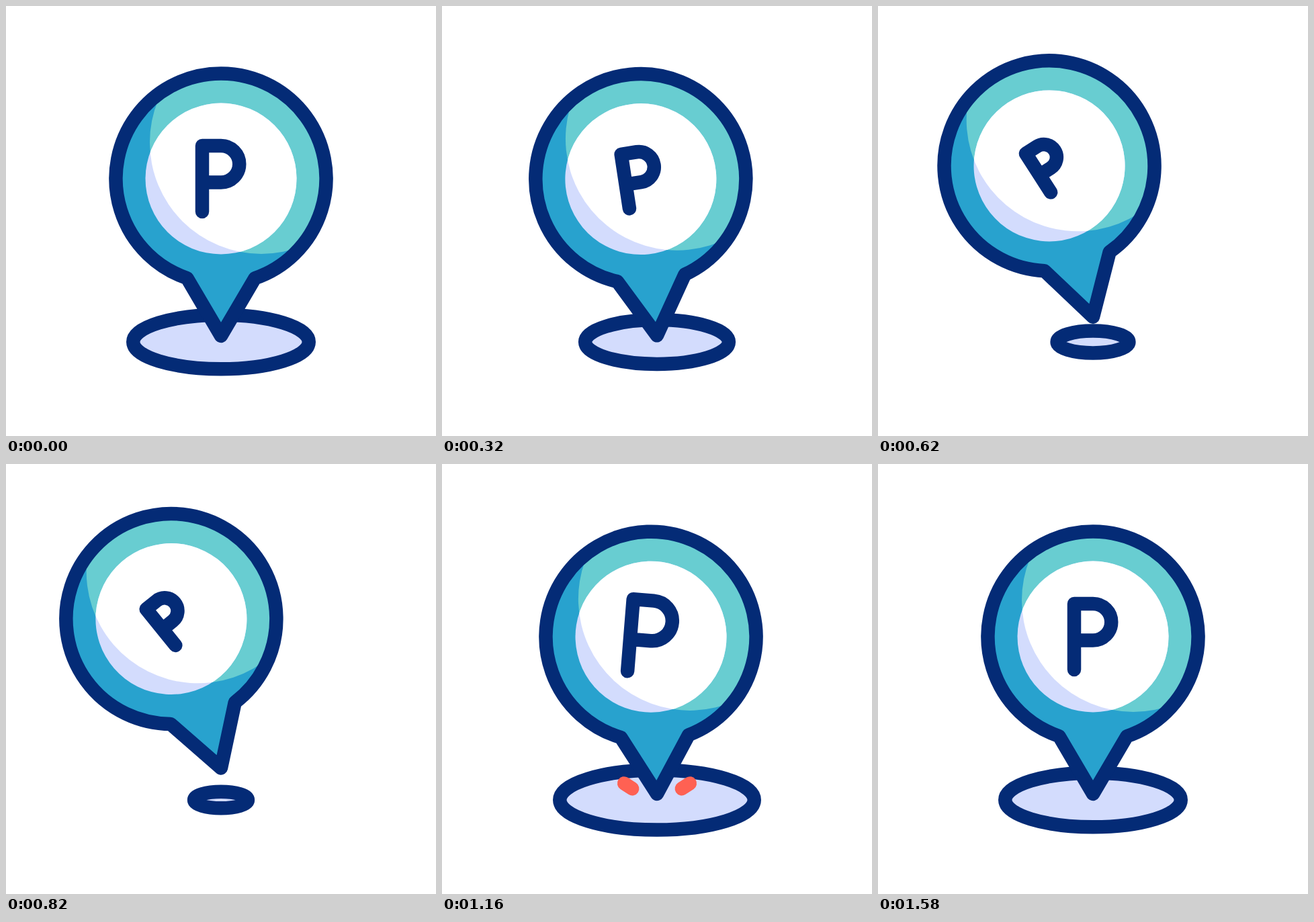
Animation, 640 px wide and 640 px high, one loop 3000 ms. Source, as an HTML page:

```html
<!DOCTYPE html>
<html lang="en">
<head>
<meta charset="utf-8">
<title>Parking pin</title>
<style>
  html, body { margin: 0; width: 100%; height: 100%; overflow: hidden; background: #fff; }
  svg { display: block; width: 100%; height: 100%; }
  .line { stroke: #042b76; stroke-width: 20.5; stroke-linecap: round; stroke-linejoin: round; }
  .spark { stroke: #ff6153; }
</style>
</head>
<body>
<svg viewBox="0 0 640 640">
  <defs>
    <!-- Pin coordinates: the tip is the origin -->
    <path id="shape" d="M0 0L-50.5 -85.9A156.5 156.5 0 1 1 50.5 -85.9Z"/>
    <clipPath id="body"><use href="#shape"/></clipPath>
    <clipPath id="lit"><circle cx="60" cy="-288" r="166"/></clipPath>
  </defs>
  <ellipse id="base" class="line" cx="320" cy="500" fill="#d3dcfd"/>
  <g id="sparks">
    <line class="line spark"/>
    <line class="line spark"/>
  </g>
  <g id="pin">
    <use href="#shape" fill="#28a2ce"/>
    <circle cx="60" cy="-288" r="166" fill="#68cdd1" clip-path="url(#body)"/>
    <circle cy="-234" r="112.5" fill="#d3dcfd"/>
    <circle cy="-234" r="112.5" fill="#fff" clip-path="url(#lit)"/>
    <use href="#shape" class="line" fill="none"/>
    <path id="letter" class="line" fill="none" vector-effect="non-scaling-stroke"
      d="M-28 49V-49H0A27.25 27.25 0 0 1 0 5.5H-28"/>
  </g>
</svg>
<script>
const LOOP = 3000, TOP = 800, DROP = 808, LAND = 1005, REST = 1580;
const get = id => document.getElementById(id);
const base = get('base'), pin = get('pin'), letter = get('letter'), sparks = get('sparks');

// Smooth step from 0 at time a to 1 at time b
function ease(t, a, b) {
  const u = Math.min(1, Math.max(0, (t - a) / (b - a)));
  return u * u * (3 - 2 * u);
}

// Sway that fades out between landing and rest
function sway(t) {
  if (t < LAND || t > REST) return 0;
  return (REST - t) / (REST - LAND) * Math.sin((t - LAND) / 250 * 2 * Math.PI);
}

function set(el, attrs) {
  for (const name in attrs) el.setAttribute(name, attrs[name]);
}

function draw(now) {
  const t = now % LOOP;
  const fall = ease(t, DROP, LAND);

  const spread = 1 - 0.7 * ease(t, 80, TOP) + 0.85 * ease(t, DROP, 1088)
    - 0.17 * ease(t, 1088, 1310) + 0.02 * ease(t, 1310, REST);
  set(base, { rx: 130.75 * spread, ry: 40.25 * spread });

  const lift = 39 * (ease(t, 280, TOP) - fall);
  const tilt = 18.7 * (fall - ease(t, 33, TOP)) + 4.3 * sway(t);
  set(pin, { transform: `translate(320 ${491 - lift}) rotate(${tilt})` });

  const size = 1 - 0.3 * ease(t, 33, 567) + 0.5 * fall - 0.2 * ease(t, LAND, 1310);
  const twist = 29.8 * fall - 20.9 * ease(t, 180, TOP) - 8.9 * ease(t, LAND, 1500);
  set(letter, { transform: `translate(0 -234) rotate(${twist}) scale(${size})` });

  const from = ease(t, 1080, 1390), to = ease(t, 1000, 1270);
  set(sparks, { visibility: to > 0 && from < 1 ? 'visible' : 'hidden' });
  [...sparks.children].forEach((line, i) => {
    const dir = i ? 1 : -1;
    const x = k => 320 + dir * (32.5 + 25.5 * k);
    const y = k => 486 - 16.5 * k;
    set(line, { x1: x(from), y1: y(from), x2: x(to), y2: y(to) });
  });
  requestAnimationFrame(draw);
}
requestAnimationFrame(draw);
</script>
</body>
</html>
```
